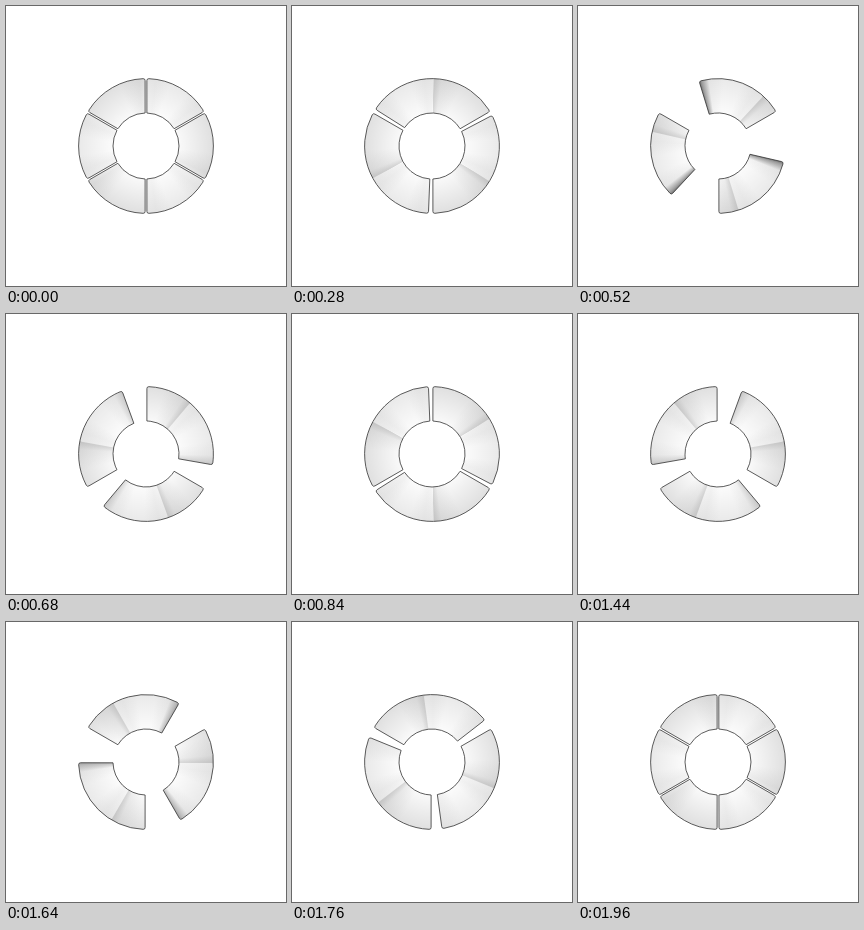
Animation, 280 px wide and 280 px high, one loop 2000 ms. Source, as an HTML page with a canvas:

```html
<!DOCTYPE html>
<html lang="en">
<head>
<meta charset="utf-8">
<title>Sliding ring</title>
<style>
html, body { margin: 0; width: 100%; height: 100%; overflow: hidden; background: #fff; }
canvas { display: block; width: 280px; height: 280px; }
</style>
</head>
<body>
<canvas id="stage" width="280" height="280"></canvas>
<script>
const ctx = document.getElementById('stage').getContext('2d');
const C = 140, OUTER = 67.4, INNER = 33;
const HALF_GAP = 0.9, ROUND = 2;     // seam half width and corner size, px
const LOOP = 2000, STEP = 40, TURN = 1000, DELAY = 60;
const rad = d => d * Math.PI / 180;
const clamp = x => Math.max(0, Math.min(1, x));
const mix = (a, b, k) => a + (b - a) * k;

const ease = u => u < 0.5
  ? 0.5 * Math.pow(2 * u, 4)
  : 1 - 0.5 * Math.pow(2 - 2 * u, 4);

// ring section whose straight sides run parallel to the seams
function band(from, to) {
  const inset = r => Math.asin(HALF_GAP / r);
  const at = (r, a) => [C + r * Math.cos(a), C + r * Math.sin(a)];
  const a = rad(from), b = rad(to);
  const o = inset(OUTER), i = inset(INNER), s = inset(OUTER - ROUND);
  const c = ROUND / OUTER;
  ctx.beginPath();
  ctx.arc(C, C, OUTER, a + o + c, b - o - c);
  ctx.quadraticCurveTo(...at(OUTER, b - o), ...at(OUTER - ROUND, b - s));
  ctx.arc(C, C, INNER, b - i, a + i, true);
  ctx.lineTo(...at(OUTER - ROUND, a + s));
  ctx.quadraticCurveTo(...at(OUTER, a + o), ...at(OUTER, a + o + c));
  ctx.closePath();
}

// stops are [degrees from the start of the band, gray level]
function fill(from, to, stops, rim) {
  const g = ctx.createConicGradient(rad(from - 90), C, C);
  for (const [deg, v] of stops) g.addColorStop((deg + 90) / 360, `rgb(${v},${v},${v})`);
  band(from, to);
  ctx.fillStyle = g;
  ctx.fill();
  const r = ctx.createRadialGradient(C, C, INNER, C, C, OUTER);
  r.addColorStop(0, 'rgba(0,0,0,0)');
  r.addColorStop(1, `rgba(0,0,0,${rim})`);
  ctx.fillStyle = r;
  ctx.fill();
}

function outline(from, to) {
  band(from, to);
  ctx.strokeStyle = '#333';
  ctx.lineWidth = 0.8;
  ctx.lineJoin = 'round';
  ctx.stroke();
}

function pair(base, p) {
  const a0 = base, a1 = base + 60;
  const b0 = base - 60 + 120 * p, b1 = b0 + 60;
  const lift = Math.pow(Math.sin(Math.PI * p), 2);
  const side = clamp((p - 0.46) / 0.08);
  const tail = 246 - 170 * lift * (1 - side);
  const head = 246 - 170 * lift * side;
  const overlap = Math.min(a1, b1) - Math.max(a0, b0);
  const shade = mix(246, 218, clamp(overlap / 2));
  const touching = overlap > 0.8;

  // resting piece, shaded next to the edge of the piece above it
  const stops = p < 0.5
    ? [[b1 - a0, shade], [b1 - a0 + 6, 238], [b1 - a0 + 24, 249]]
    : [[b0 - a0 - 24, 249], [b0 - a0 - 6, 238], [b0 - a0, shade]];
  fill(a0, a1, stops, 0.1);

  // sliding piece
  fill(b0, b1, [
    [0, tail], [3, mix(tail, 243, 0.45)], [9, 243], [22, 251],
    [38, 251], [51, 243], [57, mix(head, 243, 0.45)], [60, head]
  ], 0.07);

  if (touching) {
    outline(Math.min(a0, b0), Math.max(a1, b1));
  } else {
    outline(a0, a1);
    outline(b0, b1);
  }
}

function draw(ms) {
  const q = (ms - DELAY) / TURN;
  const turn = Math.floor(q);
  const p = ease(q - turn);
  ctx.fillStyle = '#fff';
  ctx.fillRect(0, 0, 280, 280);
  for (let k = 0; k < 3; k++) pair(-90 + 60 * turn + 120 * k, p);
}

const start = performance.now();
function tick() {
  const ms = (performance.now() - start) % LOOP;
  draw(Math.floor(ms / STEP) * STEP);
  requestAnimationFrame(tick);
}
tick();
</script>
</body>
</html>
```
